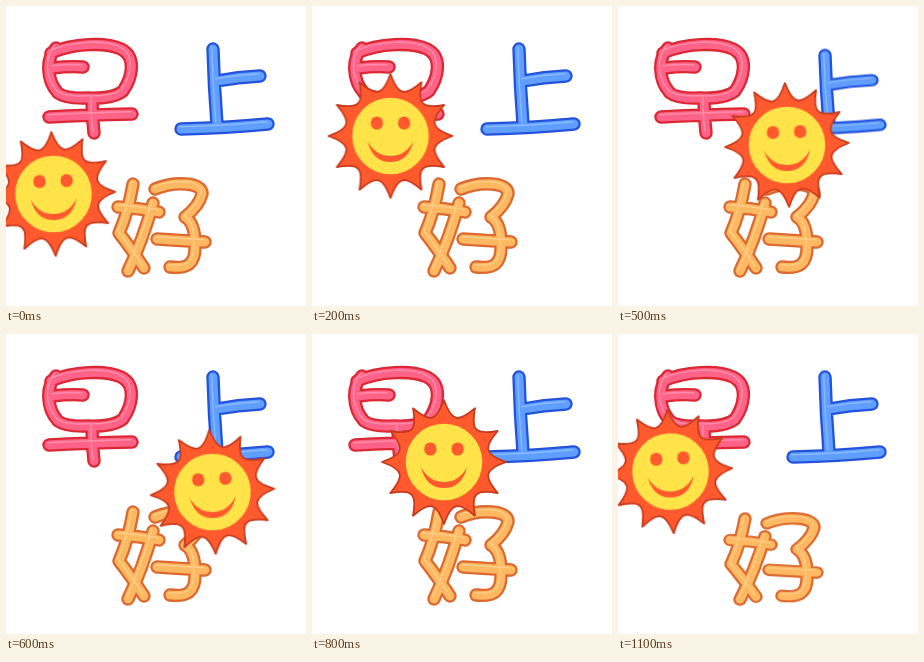
An HTML page for the animation above (1200 ms loop, 300 px wide and 300 px high).

```html
<!DOCTYPE html>
<html lang="zh">
<head>
<meta charset="utf-8">
<title>早上好</title>
<style>
html, body { margin: 0; width: 100%; height: 100%; overflow: hidden; background: #fff; }
svg { display: block; width: 100%; height: 100%; }
path { fill: none; stroke-linecap: round; stroke-linejoin: round; }
</style>
</head>
<body>
<svg id="stage" viewBox="0 0 300 300" role="img" aria-label="早上好"></svg>
<script>
const NS = 'http://www.w3.org/2000/svg';
const stage = document.getElementById('stage');
const STEP = 100, COUNT = 12;

function add(parent, tag, attrs = {}) {
  const el = document.createElementNS(NS, tag);
  for (const key in attrs) el.setAttribute(key, attrs[key]);
  parent.append(el);
  return el;
}

// Each glyph: outline, fill, highlight colours, pen path, baseline and squash steps.
const glyphs = [
  {
    colors: ['#dc2834', '#ff6488', '#ffa9bd'], base: 131, squash: [3, 9],
    pen: 'M50 42C40 52 40 74 52 87Q60 93 82 92 M45 47C67 37 100 36 115 43C131 51 126 72 117 85' +
         'Q108 93 82 92 M47 62Q63 60 77 61 M43 111Q80 109 126 108 M86 94Q86 110 88 127'
  },
  {
    colors: ['#2352dc', '#609fff', '#a5cbff'], base: 129, squash: [5, 7],
    pen: 'M207 43Q208 80 211 118 M211 75Q232 71 254 70 M175 123Q220 122 262 118'
  },
  {
    colors: ['#dc6a30', '#ffb862', '#ffdc9f'], base: 272, squash: [1, 11],
    pen: 'M127 178Q122 207 113 227Q124 241 138 262 M147 197Q137 234 122 265' +
         ' M112 201Q132 202 153 206 M149 183C168 175 197 176 196 188Q193 200 179 211' +
         ' M179 211Q189 217 189 238C190 259 181 263 164 261 M151 233L199 236'
  }
];

function stepped(el, transformAt) {
  const frames = [];
  for (let i = 0; i <= COUNT; i++) {
    frames.push({ offset: i / COUNT, transform: transformAt(i % COUNT), easing: 'steps(1, end)' });
  }
  el.animate(frames, { duration: STEP * COUNT, iterations: Infinity }).startTime = 0;
}

for (const { colors, base, squash, pen } of glyphs) {
  const g = add(stage, 'g');
  const [edge, body, shine] = colors;
  add(g, 'path', { d: pen, stroke: edge, 'stroke-width': 13.4 });
  add(g, 'path', { d: pen, stroke: body, 'stroke-width': 8.8 });
  add(g, 'path', { d: pen, stroke: shine, 'stroke-width': 1.4, opacity: 0.6, transform: 'translate(-1.2 -2.2)' });
  g.style.transformOrigin = `0 ${base}px`;
  stepped(g, i => `scaleY(${squash.includes(i) ? 0.93 : 1})`);
}

const polar = (r, deg) => {
  const a = deg * Math.PI / 180;
  return `${(r * Math.sin(a)).toFixed(2)} ${(-r * Math.cos(a)).toFixed(2)}`;
};

function rays() {
  let d = 'M' + polar(62, 0);
  for (let a = 0; a < 360; a += 30) {
    d += `C${polar(52, a + 4)} ${polar(46, a + 9)} ${polar(46, a + 15)}`;
    d += `C${polar(46, a + 21)} ${polar(52, a + 26)} ${polar(62, a + 30)}`;
  }
  return d + 'Z';
}

const sun = add(stage, 'g');
const RED = '#ff5a2d';
add(sun, 'path', { d: rays(), style: `fill:${RED}`, stroke: '#c8391c', 'stroke-width': 1.8 });
add(sun, 'circle', { r: 38.3, fill: '#ffe349' });
for (const x of [-13.6, 13.6]) add(sun, 'ellipse', { cx: x, cy: -13, rx: 6.2, ry: 6.6, fill: RED });
add(sun, 'path', { d: 'M-23 5Q-18 26 0 26T23 5Q15 20 0 20T-23 5Z', style: `fill:${RED}` });

// x, y, tilt along the way out; the way back mirrors it.
const route = [
  [47.5, 188, -2], [52.5, 137.5, -3], [78.5, 130, 0], [105, 128, 0],
  [132, 128, 0], [169, 139, -2], [206.5, 158, -3]
];
stepped(sun, i => {
  const [x, y, tilt] = route[Math.min(i, COUNT - i)];
  return `translate(${x}px, ${y}px) rotate(${tilt}deg)`;
});
</script>
</body>
</html>
```
